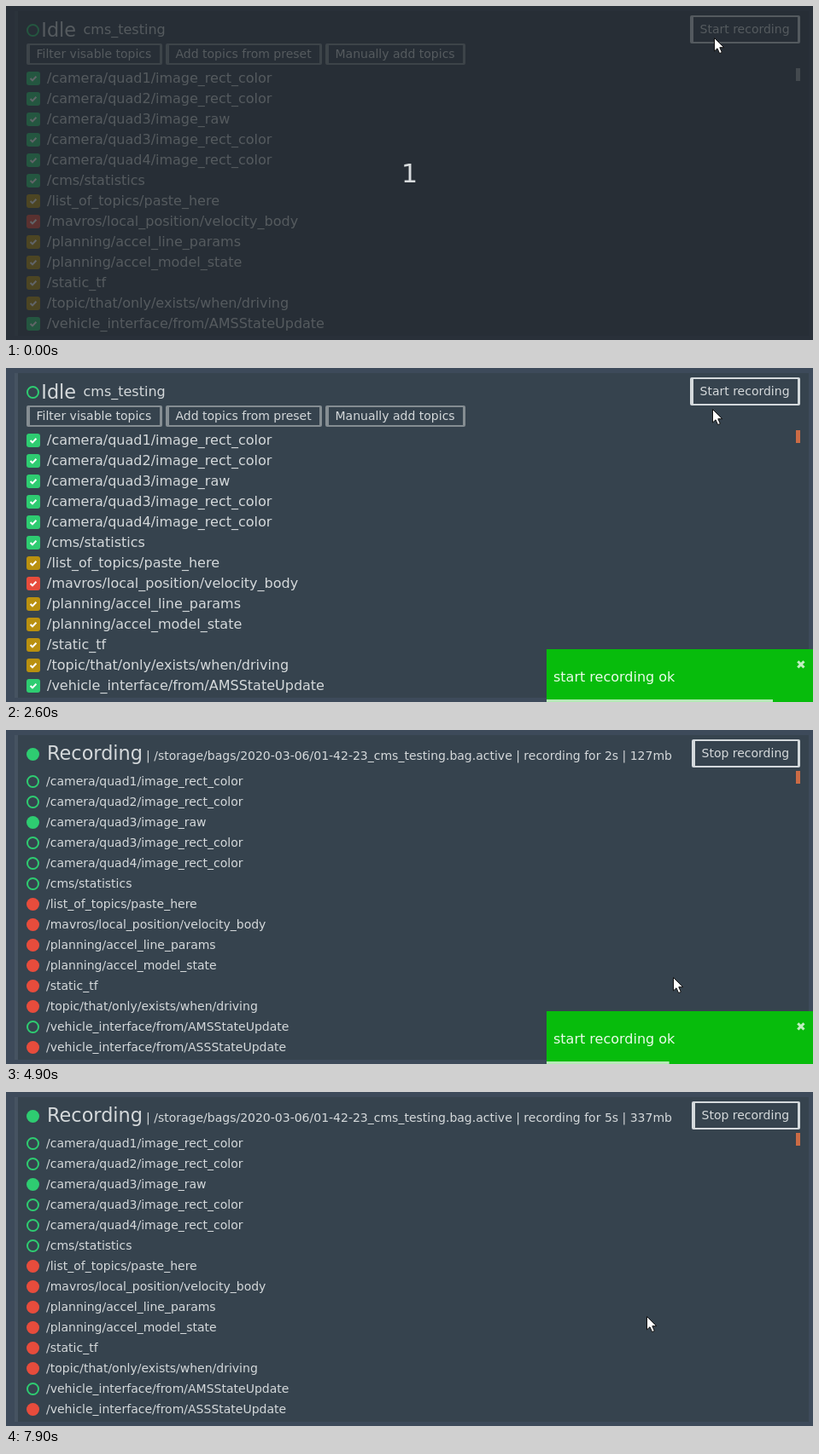
An HTML page for the animation above (8 s loop, 945x392 px).

```html
<!DOCTYPE html>
<html lang="en">
<head>
<meta charset="utf-8">
<title>Topic recorder</title>
<style>
  html, body { margin: 0; width: 100%; height: 100%; overflow: hidden; background: #3d4a5a; }
  svg { display: block; width: 945px; height: 392px; }
  text { font-family: "DejaVu Sans", Verdana, sans-serif; font-size: 14px; fill: #d5d9db; white-space: pre; }
  .large { font-size: 16px; }
  .title { font-size: 22.4px; }
</style>
</head>
<body>
<svg id="stage" viewBox="0 0 945 392" width="945" height="392"></svg>
<script>
const LOOP = 8000, STEP = 100;
const GREEN = '#2ecc71', AMBER = '#b9900f', RED = '#e74c3c';
const stage = document.getElementById('stage');

function add(parent, tag, attrs = {}, content = '') {
  const el = document.createElementNS('http://www.w3.org/2000/svg', tag);
  for (const key in attrs) el.setAttribute(key, attrs[key]);
  el.textContent = content;
  return parent.appendChild(el);
}
const group = (parent = stage) => add(parent, 'g');
const rect = (parent, x, y, width, height, fill, more) =>
  add(parent, 'rect', { x, y, width, height, fill, ...more });
const label = (parent, x, y, content, cls = '', more) =>
  add(parent, 'text', { x, y, class: cls, ...more }, content);
const show = (el, on) => el.setAttribute('display', on ? 'inline' : 'none');

function dot(parent, y, color, filled) {
  add(parent, 'circle', filled
    ? { cx: 31.5, cy: y, r: 7.5, fill: color }
    : { cx: 31.5, cy: y, r: 6.5, fill: 'none', stroke: color, 'stroke-width': 2 });
}

function button(parent, x, y, w, h, content, textX, color, fill = 'none') {
  const g = group(parent);
  rect(g, x, y, w, h, color, { rx: 2 });
  const face = rect(g, x + 4, y + 2, w - 7, h - 4, fill);
  label(g, textX, y + h / 2 + 4.7, content);
  return { g, face };
}

// Panel
rect(stage, 10, 6, 4, 381, '#465361');
rect(stage, 14, 6, 926, 381, '#36434e');

const topics = [
  ['/camera/quad1/image_rect_color', GREEN],
  ['/camera/quad2/image_rect_color', GREEN],
  ['/camera/quad3/image_raw', GREEN, true],
  ['/camera/quad3/image_rect_color', GREEN],
  ['/camera/quad4/image_rect_color', GREEN],
  ['/cms/statistics', GREEN],
  ['/list_of_topics/paste_here', AMBER],
  ['/mavros/local_position/velocity_body', RED],
  ['/planning/accel_line_params', AMBER],
  ['/planning/accel_model_state', AMBER],
  ['/static_tf', AMBER],
  ['/topic/that/only/exists/when/driving', AMBER],
  ['/vehicle_interface/from/AMSStateUpdate', GREEN],
  ['/vehicle_interface/from/ASSStateUpdate', RED],
];

// Idle view
const idle = group();
dot(idle, 28.5, GREEN, false);
label(idle, 41.3, 35.5, 'Idle', 'title');
label(idle, 90.5, 33, 'cms_testing', 'large');
const presets = [[24, 159, 'Filter visable topics', 35.5], [187, 183, 'Add topics from preset', 198.5],
  [374, 164, 'Manually add topics', 385.5]];
for (const [x, w, content, textX] of presets)
  button(idle, x, 44, w, 25, content, textX, '#858d92', '#36434e');
const start = button(idle, 801, 11, 129, 33, 'Start recording', 812.5, '#d4d9dc', '#36434e');
const focusRing = rect(start.g, 802, 12, 127, 31, 'none',
  { stroke: '#6f9fc4', 'stroke-width': 1, 'stroke-dasharray': '1 1' });
topics.slice(0, 13).forEach(([name, color], i) => {
  const y = 85 + i * 24;
  rect(idle, 24, y - 8, 16, 16, color, { rx: 3 });
  add(idle, 'path', { d: `M28.6 ${y} l2.4 2.4 l4.4 -4.6`, fill: 'none', stroke: '#fff', 'stroke-width': 2 });
  label(idle, 48, y + 5, name, 'large');
});

// Recording view
const recording = group();
dot(recording, 28.5, GREEN, true);
label(recording, 48, 35.2, 'Recording', 'title');
const info = label(recording, 164, 35, '');
button(recording, 803, 11, 127, 33, 'Stop recording', 814.5, '#d4d9dc', '#36434e');
topics.forEach(([name, color, active], i) => {
  const y = 60.5 + i * 24;
  dot(recording, y, color === GREEN ? GREEN : RED, active || color !== GREEN);
  label(recording, 47, y + 4.5, name);
});

const thumb = rect(stage, 925, 73, 5, 15, '#999fa3');

// Toast
const toast = group();
rect(toast, 633, 330, 312, 62, '#07bc0c');
label(toast, 641, 368, 'start recording ok', 'large', { style: 'fill:#eafbea' });
label(toast, 925, 353, '✖', '', { style: 'fill:#fff;font-weight:bold', opacity: .75 });
const progress = rect(toast, 633, 389, 0, 3, '#fff', { opacity: .7 });

// Countdown veil
const veil = group();
rect(veil, 0, 0, 945, 392, 'rgba(33,39,45,.71)');
label(veil, 472.5, 207, '1', '', { style: 'font-size:30px;fill:#d9dcde', 'text-anchor': 'middle' });

// Cursors, both drawn with the tip at 0,0
const arrow = add(stage, 'path', {
  d: 'M.5 .5 V16 L4 12.8 L6.6 18.6 L9.4 17.4 L6.8 11.7 H11.8 Z',
  fill: '#fff', stroke: '#111', 'stroke-width': 1,
});
const hand = group();
add(hand, 'path', {
  d: 'M-1.5 1.5 Q0 -.5 1.5 1.5 V6 Q3 4.6 4.5 6 Q6 5 7.5 6.5 Q9 5.6 10.5 7.5 V11 L9 13.5 V16.5 H0 V14.5 L-4 10 Q-4 7.6 -1.5 9.5 Z',
  fill: '#fff', stroke: '#111', 'stroke-width': 1,
});
add(hand, 'path', { d: 'M2.5 10 V13.5 M4.5 10 V13.5 M6.5 10 V13.5', stroke: '#555', 'stroke-width': .8 });

// Keys are [time, ...values]
const cursorKeys = [[0, 829, 37], [100, 830, 36], [2200, 830, 36], [2400, 827, 48], [2700, 827, 48],
  [3500, 859, 345], [3800, 859, 347], [3900, 852, 347], [4100, 852, 347], [4900, 781, 290], [5300, 750, 263]];
const barKeys = [[1800, 945], [2600, 898], [3800, 833], [6200, 710], [6700, 679], [7500, 633]];
const counterKeys = [[3700, 53], [4700, 127], [5700, 197], [6700, 267], [7900, 337]];

function tween(keys, t) {
  const next = keys.findIndex(k => k[0] > t);
  if (next === 0) return keys[0].slice(1);
  if (next < 0) return keys[keys.length - 1].slice(1);
  const a = keys[next - 1], b = keys[next], u = (t - a[0]) / (b[0] - a[0]);
  return a.slice(1).map((v, i) => v + (b[i + 1] - v) * u);
}

function draw(time) {
  const t = Math.floor(time / STEP) * STEP;
  const isRecording = t >= 3700, pressed = t >= 1800 && t < 2100;

  show(veil, t < 100);
  show(idle, !isRecording);
  show(recording, isRecording);
  show(focusRing, pressed);
  start.face.setAttribute('fill', pressed ? '#30505f' : '#36434e');
  thumb.setAttribute('y', isRecording ? 48 : 73);
  thumb.setAttribute('fill', t >= 1800 ? '#cb6b45' : '#999fa3');

  const seconds = counterKeys.filter(k => k[0] <= t).length;
  if (seconds) {
    info.textContent = '| /storage/bags/2020-03-06/01-42-23_cms_testing.bag.active' +
      ` | recording for ${seconds}s | ${counterKeys[seconds - 1][1]}mb`;
  }

  show(toast, t >= 1900 && t < 7900);
  progress.setAttribute('width', tween(barKeys, t)[0] - 633);

  const [x, y] = tween(cursorKeys, t).map(Math.round);
  const pointing = (t >= 100 && t < 2300) || y >= 330;
  show(hand, pointing);
  show(arrow, !pointing);
  for (const el of [hand, arrow]) el.setAttribute('transform', `translate(${x} ${y})`);
}

const origin = performance.now();
function tick() {
  draw((performance.now() - origin) % LOOP);
  requestAnimationFrame(tick);
}
tick();
</script>
</body>
</html>
```
